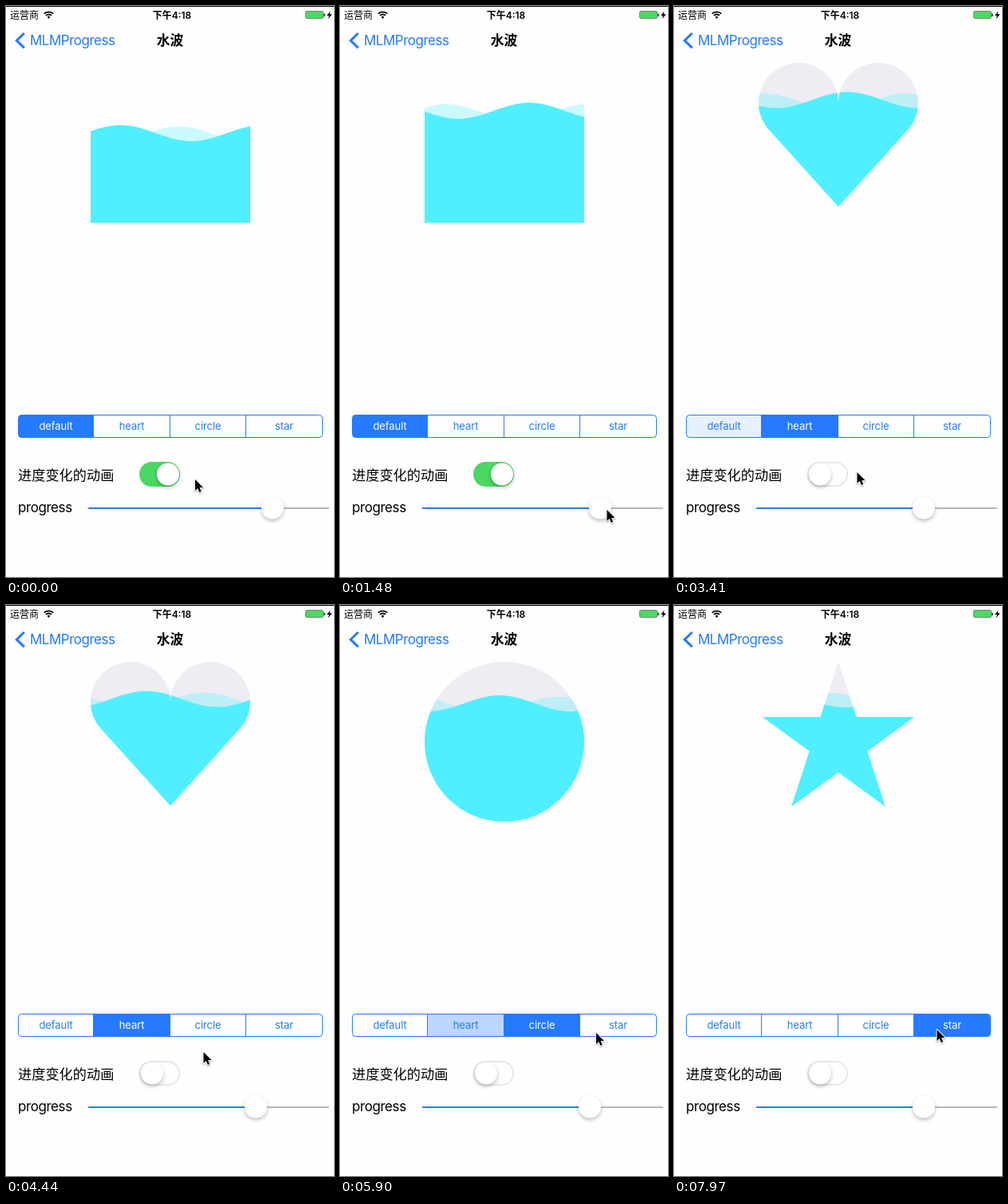
Write an HTML page with a canvas that moves like this. It is 411 px wide and 714 px high and loops after 8 s.

```html
<!DOCTYPE html>
<html lang="zh-CN">
<head>
<meta charset="utf-8">
<title>水波</title>
<style>
html, body { margin: 0; width: 100%; height: 100%; overflow: hidden; background: #fefefe; }
canvas { display: block; width: 411px; height: 714px; }
</style>
</head>
<body>
<canvas id="stage"></canvas>
<script>
const W = 411, H = 714, LOOP = 8000, STEP = 147.6;
const BLUE = '#257aff', PAPER = '#fefefe', WATER = '#50efff', TAU = Math.PI * 2;
const FONT = 'Inter, "Noto Sans CJK SC", "Noto Sans CJK", sans-serif';

const canvas = document.getElementById('stage');
const ctx = canvas.getContext('2d');
const dpr = window.devicePixelRatio || 1;
canvas.width = W * dpr;
canvas.height = H * dpr;

// Keyframes: [step, value, ...]
const LEVEL = [[0, 159], [8, 136.5], [10, 131], [14, 123]];
const SLIDER = [[8, 334], [10, 326], [12, 313]];
const CURSOR = [
  [0, 237, 592], [8, 312, 625], [9, 336, 630], [10, 334.5, 630], [12, 322, 632],
  [13, 320, 631], [15, 205, 598], [16, 198, 595], [17, 198, 595], [20, 160, 528],
  [21, 157, 528], [23, 229.5, 583], [24, 240, 588], [28, 245, 580], [32, 250, 538],
  [37, 248.5, 522], [38, 249, 523], [40, 321, 535], [43, 341, 530], [45, 342.5, 527],
  [48, 340, 530], [54, 329.5, 531]
];

// Tabs: first step, step and crest position of a known pose, water level
const TABS = [
  { name: 'default', from: 0, at: 10, crest: 237 },
  { name: 'heart', from: 21, at: 23, crest: 217, level: 117.6 },
  { name: 'circle', from: 39, at: 45, crest: 221, level: 123 },
  { name: 'star', from: 46, at: 54, crest: 125, level: 118 }
];
const EDGES = [15.5, 109.5, 205.5, 300.5, 396.5];

function track(keys, k, i = 1) {
  if (k <= keys[0][0]) return keys[0][i];
  for (let n = 1; n < keys.length; n++) {
    const a = keys[n - 1], b = keys[n];
    if (k <= b[0]) return a[i] + (b[i] - a[i]) * (k - a[0]) / (b[0] - a[0]);
  }
  return keys[keys.length - 1][i];
}

function text(str, x, y, size, color = '#000', opt = {}) {
  ctx.font = `${opt.weight || 400} ${size}px ${FONT}`;
  ctx.letterSpacing = (opt.spacing || 0) + 'px';
  ctx.textAlign = opt.align || 'left';
  ctx.fillStyle = color;
  ctx.fillText(str, x, y);
}

function poly(points, close = true) {
  ctx.beginPath();
  points.forEach(([x, y]) => ctx.lineTo(x, y));
  if (close) ctx.closePath();
}

function pill(x, y, w, h, r, color) {
  ctx.beginPath();
  ctx.roundRect(x, y, w, h, r);
  ctx.fillStyle = color;
  ctx.fill();
}

function knob(x, y, r) {
  ctx.save();
  ctx.shadowColor = 'rgba(0,0,0,.25)';
  ctx.shadowBlur = 5 * dpr;
  ctx.shadowOffsetY = 2.5 * dpr;
  ctx.beginPath();
  ctx.arc(x, y, r, 0, TAU);
  ctx.fillStyle = '#fff';
  ctx.fill();
  ctx.restore();
}

function statusBar() {
  ctx.fillStyle = '#000';
  ctx.fillRect(0, 0, W, 1);
  text('运营商', 5, 16, 12);
  text('下午4:18', 208, 16, 12, '#000', { weight: 600, align: 'center' });

  ctx.strokeStyle = '#000';
  ctx.lineWidth = 1.8;
  for (const r of [5, 8.2]) {
    ctx.beginPath();
    ctx.arc(53.5, 15.5, r, -Math.PI * 0.75, -Math.PI * 0.25);
    ctx.stroke();
  }
  ctx.beginPath();
  ctx.moveTo(53.5, 16);
  ctx.arc(53.5, 15.5, 2.6, -Math.PI * 0.75, -Math.PI * 0.25);
  ctx.fillStyle = '#000';
  ctx.fill();

  ctx.lineWidth = 0.5;
  ctx.beginPath();
  ctx.roundRect(375.5, 6.5, 22, 9, 1.5);
  ctx.stroke();
  pill(376, 7, 21, 8, 0.5, '#4cd964');
  pill(398.3, 9.5, 1.3, 3.5, 0.6, '#000');
  poly([[406.5, 6.5], [402, 12], [404.8, 12], [403.5, 16.3], [408.6, 10.3], [405.6, 10.3]]);
  ctx.fillStyle = '#000';
  ctx.fill();
}

function navBar() {
  poly([[22.8, 34], [13.3, 43.2], [22.8, 52.4]], false);
  ctx.strokeStyle = BLUE;
  ctx.lineWidth = 3;
  ctx.stroke();
  text('MLMProgress', 30, 49, 17, BLUE, { spacing: -0.5 });
  text('水波', 205.5, 49, 16.8, '#000', { weight: 600, align: 'center' });
}

function shapePath(name) {
  if (name === 'star') {
    const pts = Array.from({ length: 10 }, (_, i) => {
      const a = i * TAU / 10, r = i % 2 ? 38.2 : 100;
      return [206 + r * Math.sin(a), 171 - r * Math.cos(a)];
    });
    return poly(pts);
  }
  ctx.beginPath();
  if (name === 'circle') {
    ctx.arc(206, 171, 100, 0, TAU);
  } else if (name === 'heart') {
    const a = 2 * Math.atan(50 / 130);
    ctx.moveTo(206, 251);
    ctx.arc(156, 121, 50, Math.PI - a, TAU);
    ctx.arc(256, 121, 50, Math.PI, TAU + a);
    ctx.closePath();
  } else {
    ctx.rect(106, 71, 200, 200);
  }
}

function wave(crest, level, color) {
  ctx.beginPath();
  ctx.moveTo(106, 271);
  for (let x = 106; x <= 306; x++) {
    ctx.lineTo(x, level - 10 * Math.cos((x - crest) * 2.25 * Math.PI / 200));
  }
  ctx.lineTo(306, 271);
  ctx.fillStyle = color;
  ctx.fill();
}

function water(k, tab) {
  const speed = tab.from === 0 && k < 10 ? 26.2 : 31.3;
  const crest = tab.crest - speed * (k - tab.at);
  const level = tab.level || track(LEVEL, k);
  ctx.save();
  shapePath(tab.name);
  if (tab.from) {
    ctx.fillStyle = '#ededf3';
    ctx.fill();
  }
  ctx.clip();
  wave(crest + 73, level + 1.8, 'rgba(80,239,255,.3)');
  wave(crest, level, WATER);
  ctx.restore();
}

function tabBar(k, active) {
  ctx.save();
  ctx.beginPath();
  ctx.roundRect(15.5, 511.5, 381, 28, 4);
  ctx.clip();
  TABS.forEach((tab, i) => {
    const next = TABS[i + 1];
    let alpha = 0;
    if (i === active) alpha = 1;
    else if (k === tab.from - 1) alpha = 0.17;
    else if (next && k >= next.from) alpha = Math.max(0, 0.5 - 0.2 * (k - next.from));
    ctx.globalAlpha = alpha;
    ctx.fillStyle = BLUE;
    ctx.fillRect(EDGES[i], 511, EDGES[i + 1] - EDGES[i], 30);
  });
  ctx.restore();

  ctx.strokeStyle = BLUE;
  ctx.lineWidth = 1;
  ctx.beginPath();
  ctx.roundRect(15.5, 511.5, 381, 28, 4);
  for (const x of EDGES.slice(1, 4)) {
    ctx.moveTo(x, 511.5);
    ctx.lineTo(x, 539.5);
  }
  ctx.stroke();
  TABS.forEach((tab, i) => {
    const mid = (EDGES[i] + EDGES[i + 1]) / 2;
    text(tab.name, mid, 530, 13, i === active ? '#fff' : BLUE, { align: 'center', spacing: -0.08 });
  });
}

function toggle(k) {
  text('进度变化的动画', 15, 592.5, 17.2);
  if (k < 16) {
    pill(167, 570, 51, 31, 15.5, '#4bd763');
    knob(203, 585.5, 14);
  } else if (k === 16) {
    pill(167, 570, 51, 31, 15.5, '#abddb3');
    pill(177, 572, 31, 27, 13.5, '#fff');
    knob(193, 585.5, 14.5);
  } else {
    pill(167, 570, 51, 31, 15.5, '#e5e5e5');
    pill(168.7, 571.7, 47.6, 27.6, 13.8, PAPER);
    knob(183, 585.5, 14);
  }
}

function slider(k) {
  const x = track(SLIDER, k);
  text('progress', 15, 633, 17, '#000', { spacing: -0.43 });
  pill(103, 627, 302, 2, 1, '#b7b7b7');
  pill(103, 627, x - 103, 2, 1, BLUE);
  knob(x, 627.5, 14);
}

function cursor(k) {
  ctx.save();
  ctx.translate(track(CURSOR, k, 1), track(CURSOR, k, 2));
  poly([[0, 0], [0, 14], [3.2, 11], [5.4, 16], [7.7, 15], [5.6, 10.2], [10, 10]]);
  ctx.lineJoin = 'round';
  ctx.strokeStyle = '#fff';
  ctx.lineWidth = 2;
  ctx.shadowColor = 'rgba(0,0,0,.35)';
  ctx.shadowBlur = 2 * dpr;
  ctx.shadowOffsetY = dpr;
  ctx.stroke();
  ctx.shadowColor = 'transparent';
  ctx.fillStyle = '#000';
  ctx.fill();
  ctx.restore();
}

function draw(t) {
  // The screen refreshes in even, hard steps.
  const k = Math.min(54, Math.floor(t / STEP + 0.05));
  const active = TABS.filter(tab => k >= tab.from).length - 1;
  ctx.setTransform(dpr, 0, 0, dpr, 0, 0);
  ctx.fillStyle = PAPER;
  ctx.fillRect(0, 0, W, H);
  statusBar();
  navBar();
  water(k, TABS[active]);
  tabBar(k, active);
  toggle(k);
  slider(k);
  cursor(k);
}

const start = performance.now();
function frame() {
  draw((performance.now() - start) % LOOP);
  requestAnimationFrame(frame);
}
frame();
</script>
</body>
</html>
```
